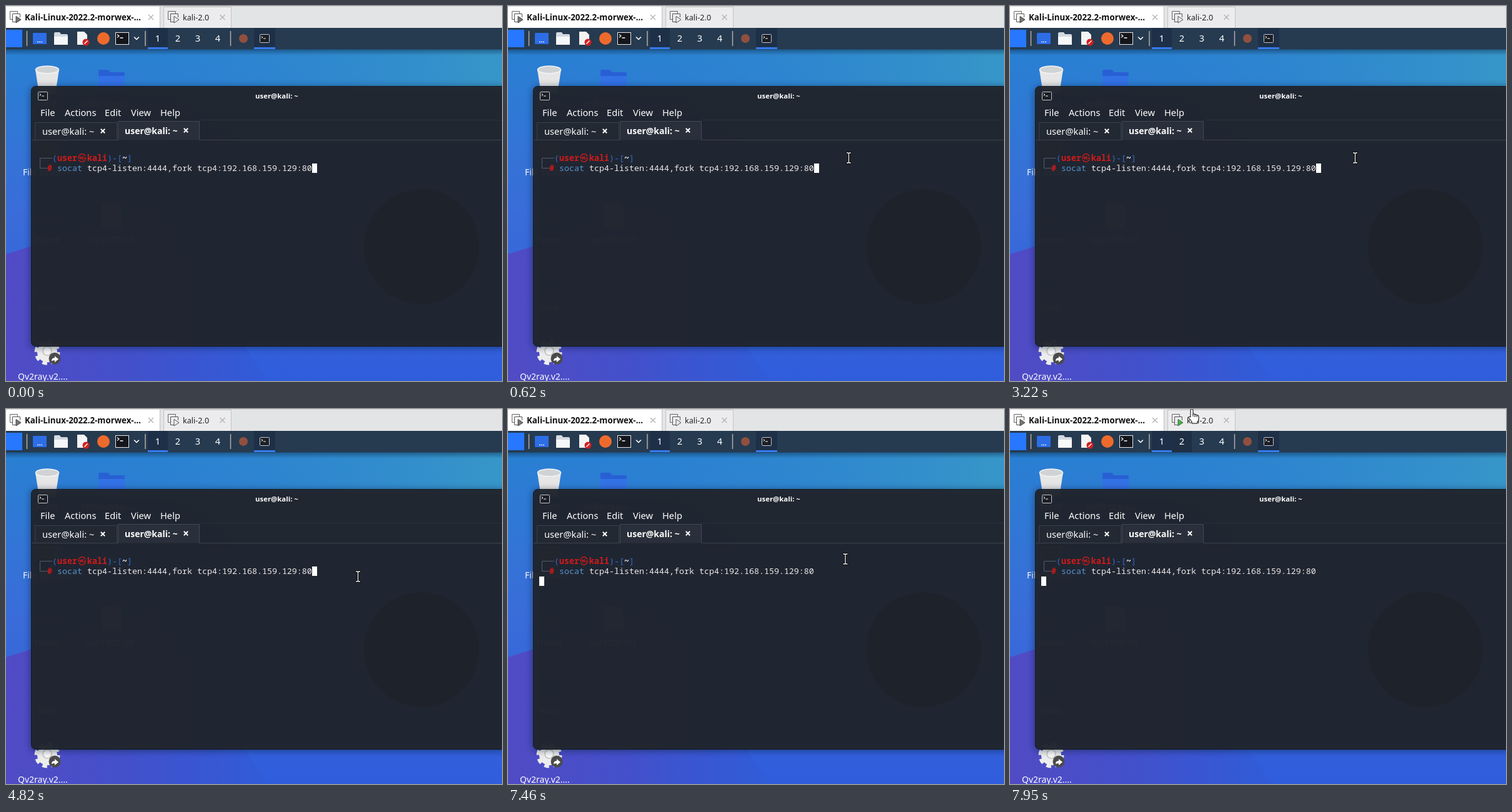
Animation of 794x600 px, one loop 8 s. Source, as an HTML page:

```html
<!DOCTYPE html>
<html lang="en">
<head>
<meta charset="utf-8">
<title>Terminal session</title>
<style>
  html, body { margin: 0; width: 100%; height: 100%; overflow: hidden; background: #2d64d2; }
  svg { display: block; }
  text { font-family: "Noto Sans", "Open Sans", sans-serif; font-size: 14.67px; fill: #fff; white-space: pre; }
  .bold { font-weight: 700; }
  .mono text { font-family: "Noto Sans Mono", "DejaVu Sans Mono", monospace; font-size: 13.333px; }
  .mono .cjk { font-family: "Noto Sans CJK KR", "Noto Sans CJK SC", "Noto Sans CJK JP", sans-serif; }
  .mid { text-anchor: middle; }
  .red { fill: #d41919 !important; }
  .blue { fill: #2f6bd0 !important; }
  .line { fill: none; stroke-linecap: round; stroke-linejoin: round; }
  .labels text { font-size: 14px; }
</style>
</head>
<body>
<svg width="794" height="600" viewBox="0 0 794 600">
  <defs>
    <linearGradient id="sky" x1="0" y1="0" x2="0" y2="1">
      <stop offset="0" stop-color="#2880d2"/><stop offset=".5" stop-color="#3a6cd9"/><stop offset="1" stop-color="#305ddc"/>
    </linearGradient>
    <linearGradient id="teal">
      <stop offset="0" stop-color="#2a7fd2" stop-opacity="0"/><stop offset="1" stop-color="#3796c8"/>
    </linearGradient>
    <linearGradient id="purple" x1="0" y1="0" x2="1" y2="0">
      <stop offset="0" stop-color="#514bc4"/><stop offset=".45" stop-color="#4350ca"/><stop offset="1" stop-color="#305cd9"/>
    </linearGradient>
    <linearGradient id="shade" x1="0" y1="0" x2="0" y2="1">
      <stop offset="0" stop-color="#06223c" stop-opacity=".45"/><stop offset="1" stop-color="#06223c" stop-opacity="0"/>
    </linearGradient>
    <filter id="blur" x="-10%" y="-10%" width="120%" height="120%"><feGaussianBlur stdDeviation="6"/></filter>
    <g id="prompt">
      <rect x=".5" y=".5" width="15" height="13" rx="1" fill="#1b1e25" stroke="#c4c8cc"/>
      <path class="line" d="M3 3.5l2 1.5-2 1.5M6.5 7h3" stroke="#fff"/>
    </g>
    <g id="machine">
      <path d="M6.5 21.500V8.500H18.500V12M6.500 21.500H10" fill="none" stroke="#666"/>
      <path d="M10.500 25.500V12.500H22.500V18M10.500 25.500H16" fill="none" stroke="#555"/>
    </g>
    <path id="cross" d="M-4 -4L4 4M4 -4L-4 4"/>
  </defs>

  <!-- wallpaper -->
  <rect y="69" width="794" height="531" fill="url(#sky)"/>
  <rect y="69" width="794" height="150" fill="url(#teal)"/>
  <path d="M0 397L230 325 420 600H0Z" fill="url(#purple)"/>
  <rect y="69" width="794" height="10" fill="url(#shade)"/>

  <!-- desktop icons -->
  <path d="M47 102L53 140H79L85 102Z" fill="#e6e6e6"/>
  <ellipse cx="66" cy="102" rx="18.500" ry="6" fill="#d0d3d5" stroke="#f4f4f4" stroke-width="1.500"/>
  <path d="M148 104q0-2 2-2h13l4 4h21q2 0 2 2v32h-42z" fill="#2860d4"/>
  <path d="M148 112h42v28h-42z" fill="#3372e6"/>
  <g opacity=".55">
    <rect x="48" y="206" width="36" height="36" rx="4" fill="#555"/>
    <circle cx="66" cy="224" r="10" fill="none" stroke="#111" stroke-width="2"/>
    <path d="M58 338l8-7 8 7v8H58z" fill="#222"/>
    <rect x="48" y="430" width="36" height="30" rx="2" fill="#3065d8"/>
    <path d="M153 315h24l8 8v32h-32z" fill="#ddd"/>
    <path d="M160 330h18M160 336h18M160 342h18" stroke="#333"/>
  </g>
  <g fill="#ededed">
    <circle cx="66" cy="554" r="16"/>
    <circle cx="66" cy="554" r="17" fill="none" stroke="#ededed" stroke-width="7" stroke-dasharray="7.350 6"/>
  </g>
  <circle cx="66" cy="552" r="7" fill="#f8f8f8" stroke="#ccc" stroke-width="2"/>
  <circle cx="78" cy="564" r="9.500" fill="#4b4b4b"/>
  <path d="M73 568q0-5 5-5v-3l6 5-6 5v-3q-3 0-5 1z" fill="#fff"/>
  <g class="labels">
    <text class="mid" x="66" y="161">Trash</text>
    <text class="mid" x="161" y="161">redis-rogu...</text>
    <text x="27" y="271">File System</text>
    <text class="mid" x="66" y="379">Home</text>
    <text class="mid" x="167" y="379">top1000.txt</text>
    <text class="mid" x="65" y="488">Tools</text>
    <text x="19" y="598">Qv2ray.v2....</text>
  </g>

  <!-- virtual machine tabs -->
  <rect width="794" height="35" fill="#e3e4e6"/>
  <path d="M0 0H794" stroke="#c9c9c9"/>
  <path d="M0 1H246.500V35H0Z" fill="#fff"/>
  <path d="M246.500 1V35" stroke="#bfc0c2"/>
  <path d="M252.500 35V1.500H360.500V35" fill="#ececee" stroke="#c3c4c6"/>
  <use href="#machine"/>
  <path d="M16 16.500V27L24 21.800Z" fill="#777" stroke="#444"/>
  <text class="bold" x="30" y="23" style="font-size:13.3px;fill:#111">Kali-Linux-2022.2-morwex-...</text>
  <use href="#machine" x="253"/>
  <path id="play" d="M269 16.500V27L277 21.800Z"/>
  <text x="283" y="23" style="font-size:12.6px;fill:#222">kali-2.0</text>
  <g stroke="#b2b2b2" stroke-width="1.300">
    <use href="#cross" x="232" y="18"/><use href="#cross" x="346.500" y="18"/>
  </g>

  <!-- panel -->
  <rect y="35" width="794" height="34.500" fill="#263a50"/>
  <rect x="227" y="35" width="32" height="34" fill="#1e3048"/>
  <rect id="hover" y="35" width="32" height="34" fill="#1f3044"/>
  <rect x="397" y="35" width="34" height="34" fill="#1e3048"/>
  <path d="M227 67.500H259M397 67.500H431" stroke="#367bf0" stroke-width="3"/>
  <path d="M33.500 40V64M223 40V64M359.500 40V64" stroke="#b9aca4" stroke-width="1.500"/>
  <rect y="38" width="26" height="28" fill="#2777ff"/>
  <rect x="43" y="43" width="22" height="18" rx="1" fill="#2d6de6"/>
  <path d="M50 57.500h8" stroke="#dce8ff" stroke-width="1.500" stroke-dasharray="2 1"/>
  <path d="M77 44q0-2 2-2h7l2 3h9q2 0 2 2v15H77z" fill="#d3d9e0"/>
  <path d="M77 49h22v13H77z" fill="#f6f7f8"/>
  <path d="M114 41h11l5 5v16h-16z" fill="#f4f4f4"/>
  <circle cx="128" cy="58" r="5.500" fill="#d22020"/>
  <path d="M125.500 60.500l5-5" stroke="#fff" stroke-width="1.500"/>
  <circle cx="156" cy="52" r="10" fill="#ee6a2c"/>
  <rect x="175.500" y="42.500" width="21" height="19" fill="#14161b" stroke="#e8e8e8"/>
  <path class="line" d="M178.500 46l2.500 2-2.500 2M183 51h4" stroke="#fff" stroke-width="1.300"/>
  <path class="line" d="M205.500 50l3.500 3.500 3.500-3.500" stroke="#fff" stroke-width="1.600"/>
  <g class="mid">
    <text x="243" y="57">1</text><text x="275" y="57">2</text>
    <text x="307" y="57">3</text><text x="339" y="57">4</text>
  </g>
  <circle cx="380" cy="52" r="7" fill="#91503f"/>
  <use href="#prompt" x="406" y="45"/>

  <!-- terminal window -->
  <rect x="40" y="130" width="780" height="416" rx="6" fill="#041226" opacity=".55" filter="url(#blur)"/>
  <rect x="40.500" y="128.500" width="780" height="416" rx="7" fill="#21252e" fill-opacity=".95" stroke="#151a22"/>
  <circle cx="665" cy="385" r="92" fill="#1e222b"/>
  <path d="M309.500 182.500H794" stroke="#2b313c"/>
  <path d="M41 214.500H179.500M309.500 214.500H794" stroke="#3b424d"/>
  <path d="M46.500 214V186.500H177.500V214" fill="#232933" stroke="#39404b"/>
  <path d="M179.500 214.500V184.500H309.500V214.500" fill="#2a303b" stroke="#424954"/>
  <use href="#prompt" x="51" y="137"/>
  <text class="bold" x="399" y="148" style="font-size:11.4px">user@kali: ~</text>
  <text x="55" y="176">File</text><text x="94" y="176">Actions</text>
  <text x="158" y="176">Edit</text><text x="200" y="176">View</text><text x="247" y="176">Help</text>
  <text x="58" y="206">user@kali: ~</text>
  <text class="bold" x="190" y="205" style="font-size:14px">user@kali: ~</text>
  <g stroke="#fff" stroke-width="2.400">
    <use href="#cross" transform="translate(155 200) scale(.8)"/>
    <use href="#cross" transform="translate(288 199) scale(.8)"/>
  </g>

  <g class="mono">
    <path d="M74 243.500H54.500V259.500H66" fill="none" stroke="#525c69"/>
    <text class="blue" x="74" y="248">(</text>
    <text class="red bold" x="82" y="248">user</text>
    <text class="red bold cjk" x="115" y="248">㉿</text>
    <text class="red bold" x="130" y="248">kali</text>
    <text class="blue" x="162" y="248">)-[<tspan class="bold" fill="#fff">~</tspan>]</text>
    <text class="red bold" x="66" y="264">#</text>
    <text x="82" y="264" style="fill:#5793cf">socat</text>
    <text id="args" x="130" y="264" style="fill:#ece8ea"></text>
    <rect id="caret" width="8" height="15" fill="#fff"/>
  </g>

  <!-- mouse pointers, each with its hot spot at 0,0 -->
  <g id="beam" class="line">
    <path d="M-3 -8H-1L0 -7L1 -8H3M0 -7V7M-3 8H-1L0 7L1 8H3" stroke="#000" stroke-width="3.400"/>
    <path d="M-3 -8H-1L0 -7L1 -8H3M0 -7V7M-3 8H-1L0 7L1 8H3" stroke="#fff" stroke-width="1.300"/>
  </g>
  <path id="arrow" d="M0 0V16L4 12.500 6.500 18 9 17 6.500 11.500H11Z" fill="#fff" stroke="#000"/>
  <g id="hand" stroke="#000" stroke-linejoin="round">
    <path d="M-2 1Q-2 -1 0 -1T2 1V7Q5 6 5 8Q8 7 8 9Q11 8 11 11V15Q11 18 9 19V22H0V19L-5 13Q-6 10 -2 12Z" fill="#fff"/>
    <path d="M2 7V11M5 8V12M8 9V12" fill="none"/>
  </g>
</svg>
<script>
const LOOP = 8000;
const ARGS = " tcp4-listen:4444,fork tcp4:192.168.159.129:80".slice(1);
const $ = id => document.getElementById(id);
const pointers = ["beam", "arrow", "hand"];

// Pointer positions [time, x, y]; each holds until the next.
const track = [
  [200, 657, 544], [270, 602, 440], [340, 534, 335], [410, 482, 272],
  [480, 497, 252], [550, 531, 245], [620, 545.5, 243],
  [1080, 549, 243], [1160, 552.5, 243],
  [4610, 555, 248], [4680, 559, 258], [4750, 562, 265], [4820, 563.5, 268],
  [7460, 540, 240], [7530, 425, 130], [7600, 310, 50], [7670, 271, 11],
  [7730, 270, 12], [7800, 275, 9], [7880, 285, 4], [7950, 291, 1]
];

function draw(t) {
  const erased = t >= 1680 && t < 3220;
  const entered = t >= 6470;
  $("args").textContent = erased ? ARGS.slice(0, -1) : ARGS;
  $("caret").setAttribute("x", entered ? 50 : erased ? 482 : 490);
  $("caret").setAttribute("y", entered ? 268 : 252);

  const spot = track.findLast(([time]) => t >= time);
  const [, x, y] = spot || [0, 0, 0];
  const shown = !spot ? "" : y < 35 ? "hand" : y < 214 ? "arrow" : "beam";
  for (const id of pointers) {
    $(id).style.display = id === shown ? "" : "none";
    $(id).setAttribute("transform", `translate(${x} ${y})`);
  }

  $("hover").style.display = t >= 7600 ? "" : "none";
  $("hover").setAttribute("x", t < 7730 ? 291 : 259);
  const lit = t >= 7730;
  $("play").setAttribute("fill", lit ? "#53a852" : "#ececee");
  $("play").setAttribute("stroke", lit ? "#2f7d35" : "#555");
}

const start = performance.now();
function tick() {
  draw((performance.now() - start) % LOOP);
  requestAnimationFrame(tick);
}
tick();
</script>
</body>
</html>
```
